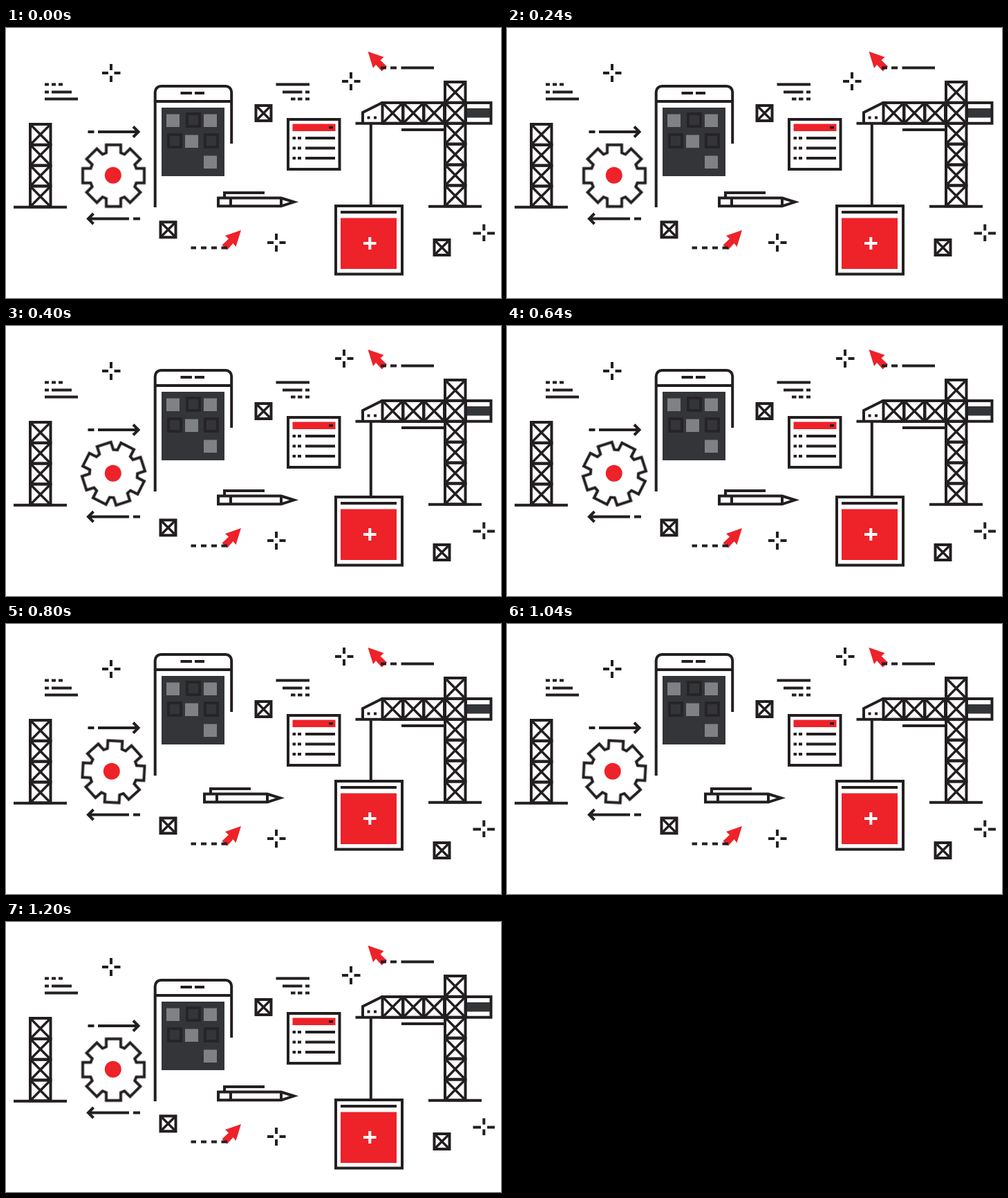
These frames come from a looping animation (716 by 390 pixels, 1.6 s). An HTML page:

```html
<!DOCTYPE html>
<html lang="en">
<head>
<meta charset="utf-8">
<title>Construction scene</title>
<style>
  html, body { margin: 0; width: 100%; height: 100%; overflow: hidden; background: #fff; }
  svg { display: block; width: 100%; height: 100%; }
  .ink { fill: none; stroke: #231f20; stroke-width: 4; }
  .thin { stroke-width: 3.5; }
  .red { fill: #ee2229; stroke: none; }
  .slate { fill: #343538; stroke: none; }
  .tile { fill: #808184; stroke: none; }
  .well { stroke: #262426; }
  .dark { fill: #231f20; stroke: none; }
</style>
</head>
<body>
<svg viewBox="0 0 716 390">
  <defs>
    <g id="crate" class="ink">
      <rect x="-11" y="-11" width="22" height="22"/>
      <path class="thin" d="M-10-10L10 10M10-10L-10 10"/>
    </g>
    <path id="spark" class="ink" d="M-13 0h9M4.500 0h9M0-13v9M0 4v9"/>
    <path id="pointer" class="red" d="M0 0L23 8L18 12.500L27.500 21.500L20 28.500L11.500 19L7.500 24Z"/>
  </defs>

  <g id="lattices" class="ink"></g>

  <!-- text-like dashes -->
  <path class="ink" d="M56 81.500h6M66 81.500h6M76 81.500h6M56 92.500h6M66 92.500h29M56 102.500h48
    M390.500 81.500h48.500M400 92.500h28.500M433 92.500h6M412 102.500h6.500M422 102.500h6.500M433 102.500h6"/>

  <!-- exchange arrows -->
  <path class="ink" d="M118.500 150h9M133 150h59M184 142.500L191.500 150L184 157.500
    M118 275.500h60M184 275.500h10M126.500 268L119 275.500L126.500 283"/>

  <g transform="translate(155.500 213.300)"><path id="gear" class="ink"/></g>
  <circle id="hub" class="red" cx="154.800" cy="212.700" r="12"/>

  <g id="phone" class="ink">
    <path d="M215.700 259V92.500a8.500 8.500 0 0 1 8.500-8.500h93.500a8.500 8.500 0 0 1 8.500 8.500V167M215.700 106H326"/>
    <path d="M252.500 94h16.500M273 94h14"/>
    <rect class="slate" x="225" y="115" width="91" height="99"/>
    <g id="tiles"></g>
  </g>

  <g id="pen" class="ink">
    <path d="M307 245.500H398L416.500 251.300L398 257.300H307ZM325 245.500v12M398 245.500v12M316 245.500V238H374"/>
    <path class="dark" d="M411 249L418 251.300L411 253.500Z"/>
  </g>

  <!-- list window -->
  <g class="ink">
    <rect x="408" y="132" width="74.500" height="72"/>
    <rect class="red" x="414.500" y="138.500" width="62" height="10.500"/>
    <rect class="dark" x="467" y="142" width="6" height="3.500"/>
    <path d="M414.500 159h4.500M422 159h5M433 159h43M414.500 173.500h4.500M422 173.500h5M433 173.500h43
      M414.500 188h4.500M422 188h5M433 188h43"/>
  </g>

  <!-- crane -->
  <g class="ink">
    <path d="M11 258.700h77M611 257.700h77M505.500 137.700H635M544 108L516 122V138M572 147h62"/>
    <rect x="665" y="108" width="36.500" height="29.700"/>
    <rect class="slate" x="667" y="116" width="33" height="13.500"/>
    <path d="M522.500 129.500h4M532 129.500h4"/>
  </g>
  <g transform="translate(527.800 138)"><path id="cable" class="ink" d="M0 0v119"/></g>
  <g id="load" class="ink">
    <rect x="477" y="257" width="96" height="98.500"/>
    <path d="M484 266h81"/>
    <rect class="red" x="484" y="274.500" width="81" height="73.500"/>
    <path stroke="#fff" style="stroke:#fff" d="M517 311h18.500M526.300 302v18"/>
  </g>

  <use href="#crate" x="372.500" y="123"/>
  <use href="#crate" x="234.500" y="291.300"/>
  <g id="drop"><use href="#crate" x="630.500" y="317"/></g>

  <use href="#spark" x="152" y="65"/>
  <g id="hop"><use href="#spark" x="499" y="77"/></g>
  <use href="#spark" x="391" y="310"/>
  <path class="ink" d="M675.500 296.500h11.500M696 296.500h11M691.300 283.500v9M691.300 299.500v8.500"/>

  <use href="#pointer" transform="translate(523.500 34)"/>
  <use href="#pointer" transform="translate(340 292) scale(-1 1)"/>
  <path class="ink" d="M542 57.500h8M556 57.500h9M571.500 57.500H619
    M267.500 317.500h7.500M282 317.500h8M297 317.500h8M311.500 317.500h8.500"/>
</svg>

<script>
const LOOP = 1600;
const $ = id => document.getElementById(id);

// A run of crossed square cells; (dx, dy) is the step from cell to cell.
function lattice(x, y, count, dx, dy, w = 29.5, h = 29.8) {
  let out = '';
  for (let i = 0; i < count; i++) {
    const l = x + i * dx, t = y + i * dy;
    out += `<rect x="${l}" y="${t}" width="${w}" height="${h}"/>` +
      `<path class="thin" d="M${l} ${t}l${w} ${h}m0 ${-h}l${-w} ${h}"/>`;
  }
  return out;
}
$('lattices').innerHTML =
  lattice(35, 139, 4, 0, 29.8) +
  lattice(635, 78, 6, 0, 29.9) +
  lattice(544.5, 108, 3, 30, 0);

const light = [[232, 124.5], [286, 124.5], [259, 154.5], [286, 184.5]];
const wells = [[262, 124], [235, 154], [288, 154]];
$('tiles').innerHTML =
  light.map(([x, y]) => `<rect class="tile" x="${x}" y="${y}" width="19" height="18.500"/>`).join('') +
  wells.map(([x, y]) => `<rect class="well" x="${x}" y="${y}" width="18" height="18"/>`).join('');

// Eight square teeth around a flat-sided body.
const tooth = [[-10.5, -33], [-10.5, -44.5], [10.5, -44.5], [10.5, -33]];
const outline = [];
for (let i = 0; i < 8; i++) {
  const c = Math.cos(i * Math.PI / 4), s = Math.sin(i * Math.PI / 4);
  for (const [x, y] of tooth) outline.push(`${(x * c - y * s).toFixed(2)} ${(x * s + y * c).toFixed(2)}`);
}
$('gear').setAttribute('d', `M${outline.join('L')}Z`);

const move = (x, y) => `translate(${x}px, ${y}px)`;
const turn = deg => `rotate(${deg}deg)`;
const stretch = length => `scaleY(${length / 119})`;
const rest = move(0, 0);

// Four equal held poses per part.
const poses = {
  gear: [turn(0), turn(-18), turn(3), turn(0)],
  hub: [rest, rest, move(-2, 0), rest],
  phone: [rest, move(0, -20), move(0, -40), rest],
  pen: [rest, rest, move(-20, 0), rest],
  cable: [119, 109, 89, 119].map(stretch),
  load: [rest, move(0, -10), move(0, -30), rest],
  drop: [rest, move(0, 10), move(0, 10), rest],
  hop: [rest, move(-10, -30), move(-10, -30), rest]
};

for (const [id, steps] of Object.entries(poses)) {
  const frames = [...steps, steps[0]].map((transform, i) => ({
    transform, offset: i / steps.length, easing: 'step-end'
  }));
  const run = $(id).animate(frames, { duration: LOOP, iterations: Infinity });
  run.startTime = 0;
}
</script>
</body>
</html>
```
